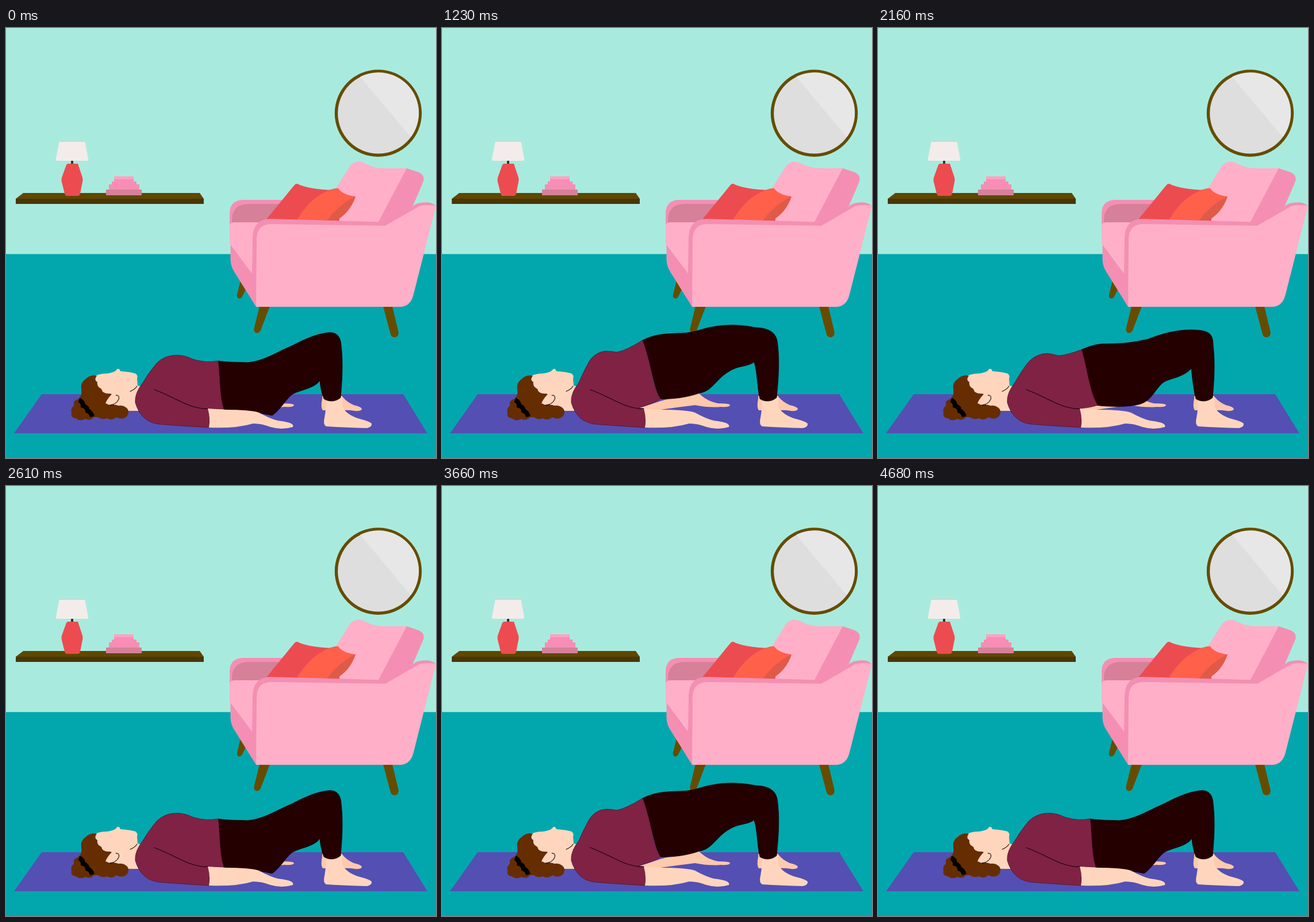
An HTML page for the animation above (4.71 s loop, 748 by 748 pixels).

```html
<!DOCTYPE html>
<html lang="en">
<head>
<meta charset="utf-8">
<title>Bridge pose</title>
<style>
  html, body { margin: 0; width: 100%; height: 100%; overflow: hidden; background: #02a7ad; }
  svg { display: block; width: 100%; height: 100%; }
  .wood { fill: #664c00; }
  .pink { fill: #ffb0c8; }
  .rose { fill: #f48fb3; }
  .mauve { fill: #d6809a; }
  .skin { fill: #ffd6bd; }
  .far { fill: #ffc9ac; }
  .line { fill: none; stroke: #180408; stroke-width: 1.1; stroke-linecap: round; }
</style>
</head>
<body>
<svg viewBox="0 0 748 748">
  <path fill="#a8ebde" d="M0,0H748V393.3H0Z"/>

  <g id="mirror">
    <circle class="wood" cx="647.5" cy="148.3" r="75.7"/>
    <circle fill="#dedede" cx="647.5" cy="148.3" r="70.3"/>
    <path fill="#e7e7e7" d="M616,85A70.3,70.3 0 0 1 704,190Z"/>
  </g>

  <g id="shelf">
    <path fill="#5f4700" d="M30,287H337L344,297H17Z"/>
    <path fill="#4a3600" d="M17,297H344V306H17Z"/>
    <path fill="#333" d="M113,230H117V237H113Z"/>
    <path fill="#f3ecea" d="M93,196H137L143,227Q144,231 140,231H90Q86,231 87,227Z"/>
    <path fill="#dcd0cf" d="M93,196H137L138,198H92Z"/>
    <path fill="#ec4c50" d="M107,236H125L133,260Q134,264 133,268L129,288Q128,292 125,292H106Q103,292 102,288L97,268Q96,264 97,260L105,238Z"/>
    <path fill="#ffa3c3" d="M188,258H222V263H188Z"/>
    <path fill="#fb8bb7" d="M188,263H222V267H227V272H184V267H188Z"/>
    <path fill="#f48fb3" d="M179,272H232V281H179Z"/>
    <path class="mauve" d="M174,281H236V291H174Z"/>
  </g>

  <g id="chair">
    <path class="wood" d="M408,439L418,453L411,467Q408,472 404,470Q401,468 402,464Z"/>
    <path class="wood" d="M441,484H459L443,526Q440,532 434,530Q430,527 432,521Z"/>
    <path class="wood" d="M656,484H672L683,530Q682,538 676,538Q671,538 669,533Z"/>
    <path class="rose" d="M389,345V322Q390,299 413,299H482L462,340Z"/>
    <path class="mauve" d="M393,340V332Q395,306 422,306H480L450,340Z"/>
    <path class="pink" d="M574,279L597,242Q606,229 621,234Q640,245 665,244L697,244L655,342H570Z"/>
    <path class="rose" d="M697,244L718,251Q729,256 726,267L708,309L660,344L648,337Z"/>
    <path fill="#ec4c50" d="M452,334L488,290Q496,280 502,273Q505,269 511,273Q535,282 578,282L580,336Z"/>
    <path fill="#ff604a" d="M506,334Q525,302 550,288Q571,277 578,279Q585,290 608,293Q598,320 574,335Z"/>
    <path fill="#e05a48" d="M608,293Q599,321 574,335H558Q580,306 608,293Z"/>
    <path class="rose" d="M390.5,374V403Q391,415 397,424L435,485L440,420Z"/>
    <path class="pink" d="M389,375V345Q389,338 397,338H445L428,427Z"/>
    <path class="rose" d="M435,485L428,428L429,365Q430,332 460,332L640,337Q656,338 664,334L716,305Q738,300 747,309L700,400L440,450Z"/>
    <path class="pink" d="M435,485L436,367Q437,341 462,341L660,344L717,311Q724,307 748,309L708.5,465Q703,485 685,485Z"/>
  </g>

  <path fill="#544fb3" d="M62,637H691L733,705H14Z"/>

  <g id="woman">
    <path class="far" d="M335,664L380,649L436,634Q446,633 452,640Q462,649 480,653Q501,653 501,656Q500,660 485,659Q465,661 440,656Q415,659 380,664Z"/>
    <path class="far" d="M550,640L586,642Q592,650 605,656Q619,659 619,663Q617,667 607,666Q595,664 586,665H551Q547,660 550,645Z"/>
    <path class="skin" d="M557,640H585V659Q592,672 612,679Q632,684 636,688Q637,694 628,696Q590,695 557,693Q551,690 554,678Q557,663 557,640Z"/>
    <path class="skin" d="M150,609Q158,601 176,601Q188,599 191,596Q196,589 199,597Q216,598 225,601Q230,604 228,610L229,622L238,624L230,666H195L150,655Z"/>
    <path class="line" d="M216,632Q224,629 228,623"/>
    <path fill="#662d00" d="M158,605Q147,602 138,611Q129,617 131,629Q133,639 126,645Q116,648 118,657Q112,662 114,669Q112,678 122,679Q128,685 138,680Q147,684 153,677L160,677Q166,682 176,679Q184,684 192,677Q202,683 211,675Q215,667 211,662Q205,656 196,657Q190,655 173,653Q176,645 184,637L181,636Q168,637 166,628Q157,623 159,616Q152,612 158,605Z"/>
    <path class="skin" d="M184,638Q196,634 197,644Q195,655 180,656L174,653Q177,645 184,638Z"/>
    <path class="line" d="M191,639Q198,638 196,646Q192,655 180,656"/>
    <path fill="none" stroke="#000" stroke-width="8" d="M127,647Q134,650 134,657Q141,659 142,666Q148,668 150,676"/>
    <path id="pants" fill="#250000" stroke="#0c0000" stroke-width=".8"/>
    <path id="shirt" fill="#802244" stroke="#4c1028" stroke-width=".7"/>
    <path class="skin" d="M351,662L380,664Q425,664 440,669Q460,680 473,683Q490,685 496,688Q501,691 499,694Q480,700 460,694Q445,688 430,688Q400,697 353,695Q356,680 351,662Z"/>
    <path class="line" d="M258,629C290,641 312,657 336,661Q344,663 351,662"/>
  </g>
</svg>
<script>
const LOOP = 4710, CYCLE = LOOP / 2;
const RISE = 860, FALL = 2000, MOVE = 320;

// Each body part with hips down, halfway and up, using matching path commands.
const poses = {
  pants: [
    `M369,579C390,582 400,581 420,582C450,579 470,564 497,553C520,541 540,532 560,530
     C574,528 582,536 583,552C587,585 584,620 582,643C574,650 562,651 553,645
     C549,635 547,625 546,613C538,626 515,629 500,636C488,643 478,664 463,674
     C440,669 410,666 378,663C371,640 373,610 369,579Z`,
    `M354,559C372,552 380,549 400,549C430,549 448,546 470,541C495,531 520,525 545,525
     C572,526 583,528 583,552C587,585 584,620 582,643C574,650 562,651 553,645
     C549,630 547,610 545,592C532,606 515,608 500,614C484,622 478,648 456,654
     C435,660 400,659 378,656C367,630 364,590 354,559Z`,
    `M349,543C370,533 385,532 410,531C440,531 450,523 470,520C490,516 515,515 545,521
     C570,522 583,530 584,552C588,585 584,620 582,643C574,650 562,651 553,645
     C548,625 549,600 543,581C530,590 515,587 500,597C477,610 470,632 448,635
     C425,643 400,646 380,645C368,625 366,590 349,543Z`
  ],
  shirt: [
    `M225,652Q223,636 238,617Q247,601 262,583Q276,569 297,569Q311,569 325,576
     Q348,583 369,579C373,610 371,640 379,663Q365,663 351,662L351,662
     Q356,680 353,695Q300,692 265,689Q235,685 225,652Z`,
    `M225,652Q223,636 238,617Q247,600 260,583Q275,566 295,566Q304,567 314,570
     Q332,568 354,559C364,590 367,630 382,656Q372,660 351,662L351,662
     Q356,680 353,695Q300,692 265,689Q235,685 225,652Z`,
    `M225,652Q223,636 238,617Q245,600 256,580Q266,564 284,562Q294,562 304,564
     Q320,561 349,543C366,590 366,625 380,645Q372,652 340,661L351,662
     Q356,680 353,695Q300,692 265,689Q235,685 225,652Z`
  ]
};

const ease = x => (1 - Math.cos(Math.PI * Math.min(1, Math.max(0, x)))) / 2;

function blend(from, to, amount) {
  const ends = to.match(/\d+/g);
  let i = 0;
  return from.replace(/\d+/g, n => +n + (ends[i++] - n) * amount);
}

function draw() {
  const t = performance.now() % CYCLE;
  const lift = 2 * (ease((t - RISE) / MOVE) - ease((t - FALL) / MOVE));
  const step = lift < 1 ? 0 : 1;
  for (const id in poses) {
    const shape = blend(poses[id][step], poses[id][step + 1], lift - step);
    document.getElementById(id).setAttribute("d", shape);
  }
  requestAnimationFrame(draw);
}
draw();
</script>
</body>
</html>
```
